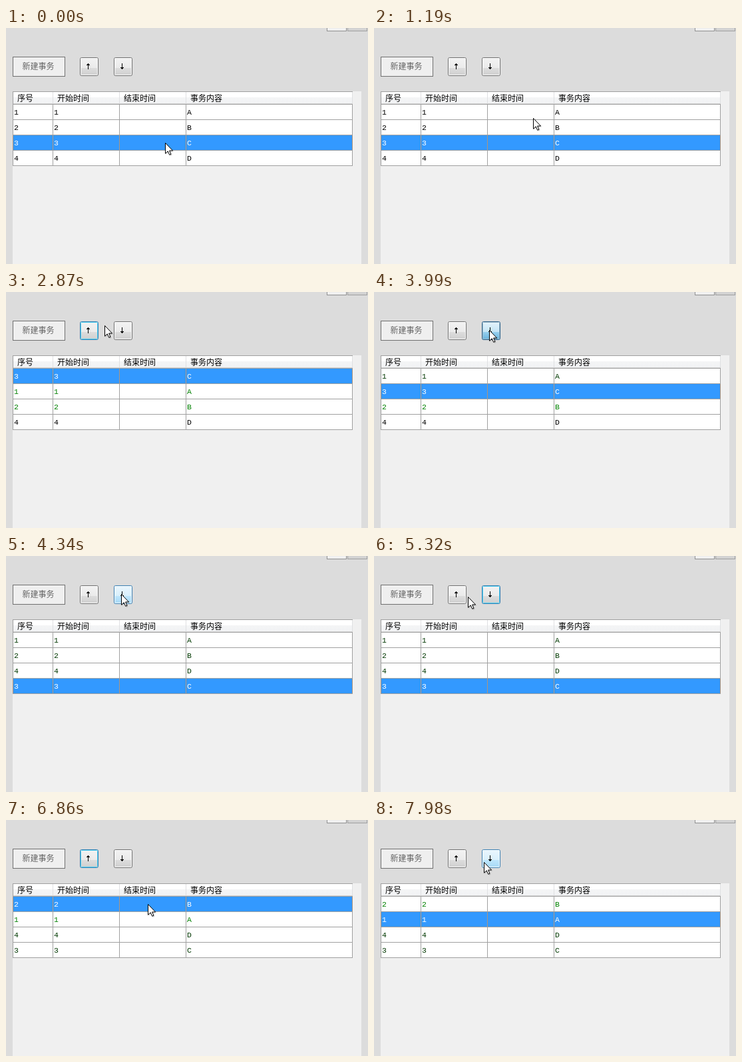
Animation of 544x354 px, one loop 8000 ms. Source, as an HTML page:

```html
<!DOCTYPE html>
<html lang="zh">
<head>
<meta charset="utf-8">
<title>事务</title>
<style>
  html, body { margin: 0; width: 100%; height: 100%; overflow: hidden; background: #dcdcdc; }
  svg { display: block; width: 544px; height: 354px; }
  text { font: 12px "Noto Sans CJK SC", "Noto Sans CJK", sans-serif; }
  .cell { font: 11.5px "Liberation Mono", monospace; }
  .crisp { shape-rendering: crispEdges; }
</style>
</head>
<body>
<svg id="stage" viewBox="0 0 544 354" xmlns="http://www.w3.org/2000/svg"></svg>
<script>
const LOOP = 8000, TICK = 70;
const COLUMNS = [10, 70, 170, 270, 520];
const TOP = 114, ROW = 23;
const BUTTON = { y: 44, size: 28, x: { up: 111, down: 162 } };
const HEADINGS = ['序号', '开始时间', '结束时间', '事务内容'];

// rows repainted by each button keep its tint
const TINT = { up: '#008000', down: '#003800' };

const GREY = ['#f2f2f2', '#ebebeb', '#dddddd', '#cfcfcf'];
const LOOKS = {
  normal: { border: '#707070', rim: '#fcfcfc', fill: GREY },
  focus: { border: '#3c7fb1', rim: '#48cdf0', fill: GREY },
  hover: { border: '#3c7fb1', rim: '#f4fbff', fill: ['#eaf6fd', '#d9f0fc', '#bee6fd', '#a7d9f5'] },
  press: { border: '#2c628b', rim: '#9db9c9', fill: ['#e5f4fc', '#c4e5f6', '#98d1ef', '#68b3db'] }
};

// what is clicked: a button, or the index of a row
const CLICKS = [
  { at: 1960, on: 'up', hold: 140 }, { at: 2520, on: 'up' },
  { at: 3500, on: 'down' }, { at: 3990, on: 'down' }, { at: 4270, on: 'down' },
  { at: 5740, on: 1 }, { at: 6510, on: 'up' }, { at: 7560, on: 1 }
];

// straight pointer strokes: start, end, x, y
const STROKES = [
  [0, 140, 300, 172], [980, 1610, 118, 62], [1680, 1820, 119, 68],
  [2660, 2870, 148, 50], [2870, 3360, 173, 57], [4830, 5320, 141, 61],
  [5320, 5600, 226, 158], [5880, 6440, 122, 62], [6650, 6860, 213, 126],
  [6860, 7000, 292, 178], [7000, 7210, 217, 122], [7280, 7420, 231, 159],
  [7560, 7980, 165, 63]
];

function pointerAt(t) {
  let x = 239, y = 172;
  for (const [start, end, toX, toY] of STROKES) {
    const k = Math.min(1, Math.max(0, (t - start) / (end - start)));
    x += (toX - x) * k;
    y += (toY - y) * k;
  }
  return [Math.round(x), Math.round(y)];
}

// replay the clicks made so far
function stateAt(t) {
  const order = [...'1234'], tint = {};
  let selected = 2, focus = null, pressed = null;
  for (const { at, on, hold = TICK } of CLICKS) {
    if (t < at) break;
    focus = on;
    if (typeof on === 'number') {
      selected = on;
    } else if (t < at + hold) {
      pressed = on;
    } else {
      const target = selected + (on === 'up' ? -1 : 1);
      [order[selected], order[target]] = [order[target], order[selected]];
      tint[order[selected]] = tint[order[target]] = TINT[on];
      selected = target;
    }
  }
  return { order, tint, selected, focus, pressed };
}

function lookOf(name, state, [x, y]) {
  const dx = x - BUTTON.x[name], dy = y - BUTTON.y;
  const inside = Math.min(dx, dy) >= 0 && Math.max(dx, dy) < BUTTON.size;
  if (state.pressed === name) return 'press';
  return inside ? 'hover' : state.focus === name ? 'focus' : 'normal';
}

const rect = (x, y, w, h, fill, extra = '') =>
  `<rect x="${x}" y="${y}" width="${w}" height="${h}" fill="${fill}" ${extra}/>`;
const label = (x, y, text, fill = '#000', extra = '') =>
  `<text x="${x}" y="${y}" fill="${fill}" ${extra}>${text}</text>`;
const gradient = (id, colours, split) =>
  `<linearGradient id="${id}" x1="0" y1="0" x2="0" y2="1">` +
  colours.map((c, i) => `<stop offset="${[0, split, split, 1][i]}" stop-color="${c}"/>`).join('') +
  '</linearGradient>';

function arrowButton(name, look) {
  const { border, rim } = LOOKS[look];
  const flip = name === 'down' ? 'translate(0 115) scale(1 -1)' : '';
  return `<g transform="translate(${BUTTON.x[name]} 0)">` +
    rect(.5, 44.5, 27, 27, `url(#${look})`, `rx="2" stroke="${border}"`) +
    rect(1.5, 45.5, 25, 25, 'none', `rx="1" stroke="${rim}"`) +
    `<path class="crisp" transform="${flip}" d="M12 53h1v1h1v1h1v1h-2v6h-1v-6h-2v-1h1v-1h1z"/></g>`;
}

function tableRow(id, i, on, ink) {
  const y = TOP + i * ROW, line = on ? '#b0947c' : '#a0a0a0';
  const cells = [id, id, '', 'ABCD'[id - 1]];
  return '<g class="crisp">' +
    rect(10, y, 511, ROW + 1, '#a0a0a0') + rect(11, y + 1, 509, ROW - 1, on ? '#3399ff' : '#fff') +
    COLUMNS.map(x => rect(x, y + 1, 1, ROW - 1, line)).join('') + '</g>' +
    cells.map((s, c) => label(COLUMNS[c] + 2, y + 16, s, on ? '#fff' : ink, 'class="cell"')).join('');
}

document.getElementById('stage').innerHTML = '<defs>' +
  Object.entries(LOOKS).map(([id, look]) => gradient(id, look.fill, .56)).join('') +
  gradient('head', ['#fff', '#fff', '#f4f5f6', '#f1f2f4'], .44) + '</defs>' +
  '<g class="crisp">' +
  rect(0, 0, 544, 354, '#dcdcdc') +
  rect(482.5, -5, 29, 9.5, '#f0f0f0', 'stroke="#909090"') +
  rect(513.5, -5, 29, 9.5, '#d2d2d2', 'stroke="#a0a0a0"') +
  rect(10, 95, 524, 259, '#f0f0f0') +
  rect(10.5, 43.5, 78, 29, '#efefef', 'stroke="#707070"') +
  rect(10, 95, 511, 20, '#a0a0a0') + rect(11, 96, 510, 18, 'url(#head)') +
  rect(11, 113, 510, 1, '#d5d5d5') +
  COLUMNS.slice(1).map(x => rect(x, 96, 1, 17, '#dfe0e2')).join('') + '</g>' +
  label(24.5, 62, '新建事务', '#626262') +
  HEADINGS.map((s, i) => label(COLUMNS[i] + 7, 109.5, s)).join('') +
  '<g id="rows"></g><g id="buttons"></g>' +
  '<g id="pointer"><path d="M1.5 2V18L5.5 14.5L8 20L10.5 19L8 13.5H13.5Z" opacity=".15"/>' +
  '<path d="M.5 .5V16.3L4.2 12.8L6.7 18.3L9 17.3L6.6 12H11.6Z" fill="#fff" stroke="#000"/></g>';

const [rows, buttons, pointer] = ['rows', 'buttons', 'pointer'].map(id => document.getElementById(id));

let shown;
function draw(now) {
  const t = Math.floor((now % LOOP) / TICK) * TICK;
  if (t === shown) return;
  shown = t;
  const state = stateAt(t), tip = pointerAt(t);
  rows.innerHTML = state.order.map((id, i) =>
    tableRow(id, i, i === state.selected, state.tint[id] || '#000')).join('');
  buttons.innerHTML = Object.keys(BUTTON.x).map(name =>
    arrowButton(name, lookOf(name, state, tip))).join('');
  pointer.setAttribute('transform', `translate(${tip})`);
}

const start = performance.now();
function tick() {
  draw(performance.now() - start);
  requestAnimationFrame(tick);
}
tick();
</script>
</body>
</html>
```
